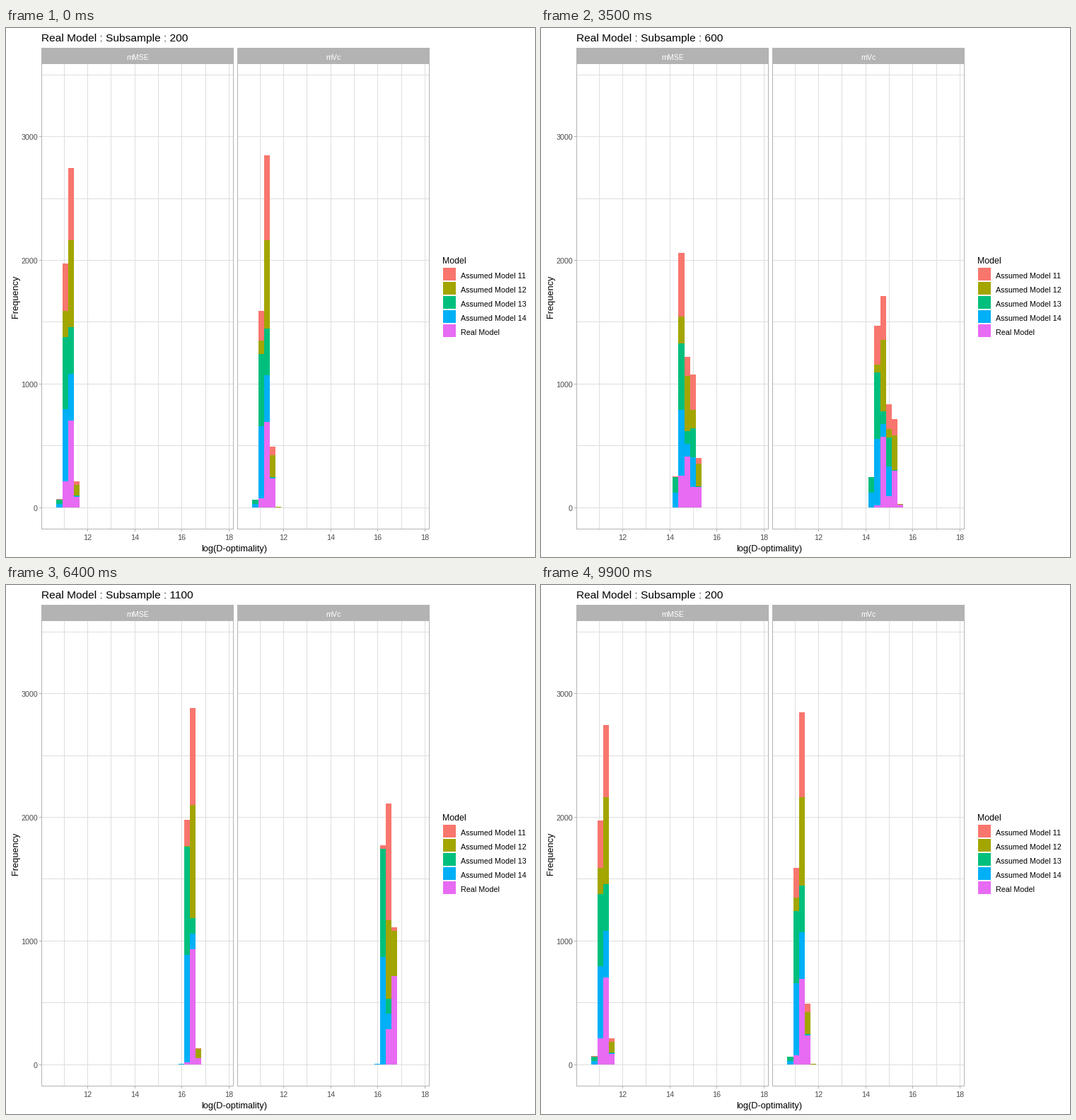
A matplotlib script for the animation above (10 s loop, 748 by 748 pixels).

```python
import math
import numpy as np
import matplotlib.pyplot as plt
from matplotlib.animation import FuncAnimation
from matplotlib.collections import PolyCollection
from matplotlib.patches import Rectangle

SIZE, DPI = 748, 88
PX = 72 / DPI
plt.rcParams["font.family"] = "Liberation Sans"

GREY, GRID, LABEL = "#B3B3B3", "#DEDEDE", "#4D4D4D"
RED, OLIVE, GREEN, BLUE, PINK = "#F8766D", "#A3A500", "#00BF7D", "#00B0F6", "#E76BF3"
MODELS = [("Assumed Model 11", RED), ("Assumed Model 12", OLIVE),
          ("Assumed Model 13", GREEN), ("Assumed Model 14", BLUE),
          ("Real Model", PINK)]

SHIFT = 277                  # distance between the two panels
X_BIN, W_BIN, BINS = 71.4, 8.2, 29
Y_ZERO, Y_UNIT = 678, 0.17483

# Each model's 1000 values are normal; in bins, their centre lies at
# 12.22 ln(n / 200) + limit - drop * 200 / n.  (limit, drop) per model:
LOW = (1.865, 0)
CENTRES = {
    "mMSE": [(2.433, 0.305), (2.89, 0.52), LOW, LOW, (2.82, 0.45)],
    "mVc": [(2.74, 0.42), (3.19, 0.615), LOW, LOW, (3.46, 0.79)],
}
STATES = range(200, 1600, 100)
HOLD = 5
STEPS = [4] * 3 + [3] * 3 + [2] + [3] * 7

normal_cdf = np.vectorize(lambda z: 0.5 * (1 + math.erf(z / math.sqrt(2))))


def bin_counts(n, limit, drop):
    ratio = n / 200
    centre = 12.22 * math.log(ratio) + limit - drop / ratio
    sigma = 0.46 * ratio ** -0.33
    return 1000 * np.diff(normal_cdf((np.arange(BINS + 1) - centre) / sigma))


def stack_tops(n):
    """Array of panel x level x bin, level 0 being the axis."""
    out = []
    for params in CENTRES.values():
        rows = [bin_counts(n, *p) for p in reversed(params)]
        out.append(np.vstack([np.zeros(BINS), np.cumsum(rows, axis=0)]))
    return np.array(out)


TOPS = [stack_tops(n) for n in STATES]


def timeline():
    """(old state, new state, progress) for every frame."""
    frames = [(0, 0, 1.0)] * (HOLD - 1)
    for i, steps in enumerate(STEPS):
        new = (i + 1) % len(STATES)
        frames += [(i, new, (s + 1) / steps) for s in range(steps)]
        frames += [(new, new, 1.0)] * (HOLD - 1)
    return frames[:100]


FRAMES = timeline()

fig = plt.figure(figsize=(SIZE / DPI, SIZE / DPI), dpi=DPI, facecolor="white")
ax = fig.add_axes([0, 0, 1, 1])
ax.set_xlim(0, SIZE)
ax.set_ylim(SIZE, 0)
ax.axis("off")


def text(x, y, s, size, color="black", ha="left", **kw):
    return ax.text(x, y, s, fontsize=size * PX, color=color, ha=ha,
                   va="baseline", **kw)


def box(x, y, w, h, color, z=1):
    ax.add_patch(Rectangle((x, y), w, h, fc=color, ec="none", lw=0,
                           antialiased=False, zorder=z))


def draw_panel(dx, name):
    left, top, w, h = 50 + dx, 50, 272, 659
    box(left, 28, w, 22, GREY)
    text(186 + dx, 44.5, name, 10.6, "white", "center")
    for v in range(11, 19):
        x = math.floor(115.5 + 33.35 * (v - 12)) + dx
        box(x, top, 1, h, GRID)
        if v % 2 == 0:
            box(x, top + h, 1, 3, GREY)
            text(x + 0.5, 724, str(v), 10.7, LABEL, "center")
    for v in range(0, 4000, 500):
        y = math.floor(Y_ZERO - Y_UNIT * v + 0.2)
        box(left, y, w, 1, GRID)
        if dx == 0 and v % 1000 == 0:
            box(left - 3, y, 3, 1, GREY)
            text(45, y + 5, str(v), 10.7, LABEL, "right")
    for y in (top, top + h - 1):
        box(left, y, w, 1, GREY, 4)
    for x in (left, left + w - 1):
        box(x, top, 1, h, GREY, 4)


for p, panel in enumerate(CENTRES):
    draw_panel(SHIFT * p, panel)

text(323, 740, "log(D-optimality)", 12.7, ha="center")
text(17, 379.5, "Frequency", 12.8, ha="center", rotation=90, rotation_mode="anchor")
text(617, 332.5, "Model", 12.4)
for i, (name, color) in enumerate(MODELS):
    box(618, 339 + 20 * i, 18, 18, color)
    text(643, 354 + 20 * i, name, 10.75)

title = text(50, 19, "", 15.5)
bars = PolyCollection([], facecolors=[c for _, c in reversed(MODELS)],
                      edgecolors="none", linewidths=0, antialiaseds=False, zorder=3)
ax.add_collection(bars, autolim=False)


def bar_shapes(tops):
    """Rectangles of all stacks, each from bottom to top."""
    ys = np.round(Y_ZERO - Y_UNIT * tops)
    shapes = []
    for panel in (0, 1):
        xs = np.round(X_BIN + W_BIN * np.arange(BINS + 1)) + SHIFT * panel
        for k in range(BINS):
            x0, x1 = xs[k], xs[k + 1]
            for y0, y1 in zip(ys[panel, :-1, k], ys[panel, 1:, k]):
                shapes.append([(x0, y0), (x1, y0), (x1, y1), (x0, y1)])
    return shapes


def draw(frame):
    old, new, t = FRAMES[frame]
    bars.set_verts(bar_shapes((1 - t) * TOPS[old] + t * TOPS[new]))
    title.set_text(f"Real Model : Subsample : {STATES[new if t >= 0.5 else old]}")
    return bars, title


anim = FuncAnimation(fig, draw, frames=len(FRAMES), interval=100, repeat=True,
                     repeat_delay=0, blit=False)
plt.show()
```
